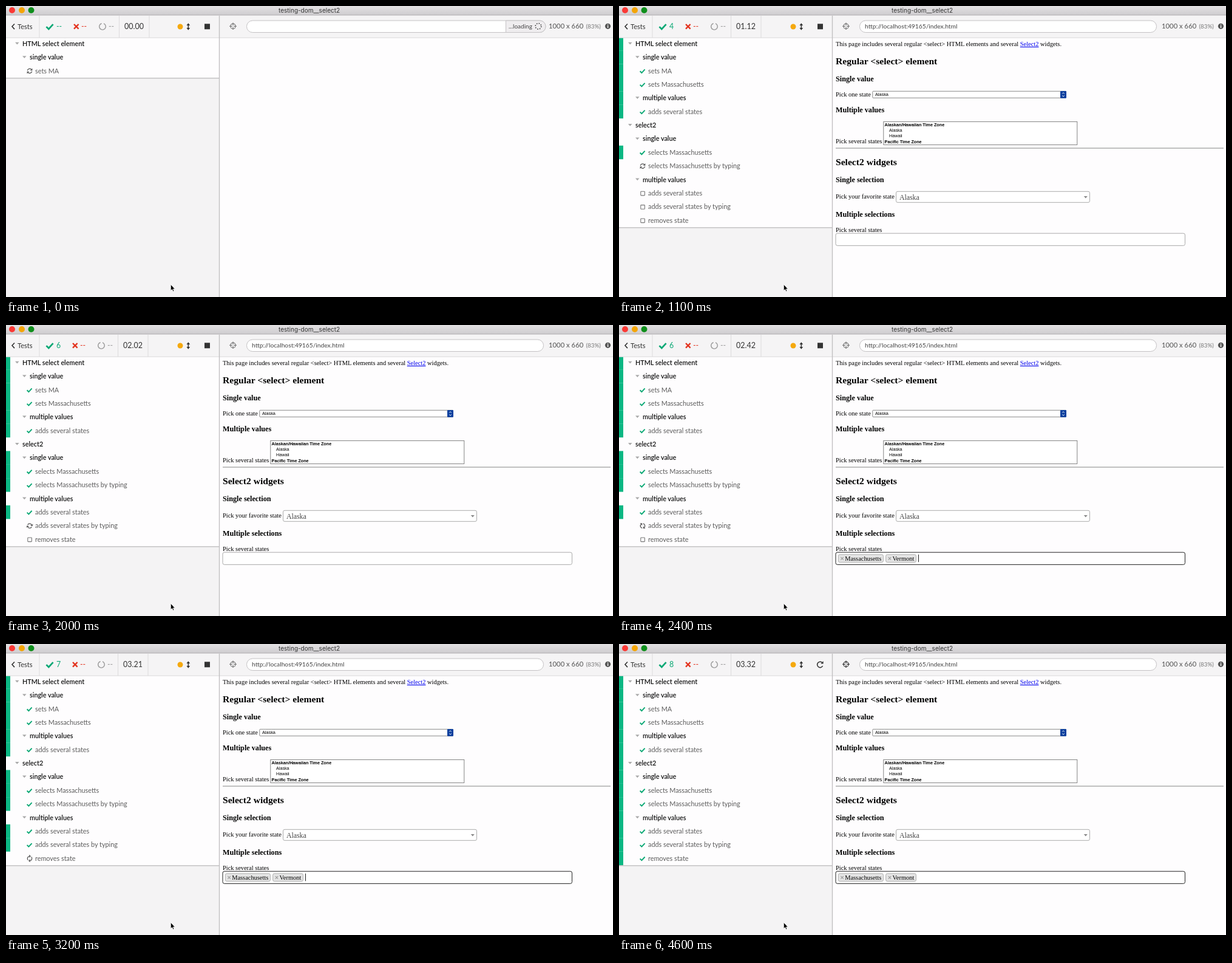
Write an HTML page that moves like this. It is 1000 px wide and 479 px high and loops after 4700 ms.

```html
<!DOCTYPE html>
<html lang="en">
<head>
<meta charset="utf-8">
<title>testing-dom__select2</title>
<style>
  html, body { margin: 0; width: 100%; height: 100%; overflow: hidden; background: #fefdfe; }
  svg { display: block; width: 100vw; height: 100vh; }
  .ui { font-family: Lato, sans-serif; }
  .page { font-family: "Liberation Serif", "Times New Roman", serif; }
  .small { font-family: "Liberation Sans", Arial, sans-serif; }
  .title { font-family: Inter, sans-serif; }
</style>
</head>
<body>
<svg id="stage" viewBox="0 0 1000 479"></svg>
<script>
const LOOP = 4700, STEP = 100, DONE = 3300;
const PAPER = '#fefdfe', GREEN = '#0aa874', RED = '#e3331f', GREY = '#595959';
const ROW = 22.37, TOP = 50.8, BODY = 10.42, OPTION = 19.4;

// depth, label, index of the last test inside
const rows = [
  [0, 'HTML select element', 2],
  [1, 'single value', 1],
  [2, 'sets MA', 0],
  [2, 'sets Massachusetts', 1],
  [1, 'multiple values', 2],
  [2, 'adds several states', 2],
  [0, 'select2', 7],
  [1, 'single value', 4],
  [2, 'selects Massachusetts', 3],
  [2, 'selects Massachusetts by typing', 4],
  [1, 'multiple values', 7],
  [2, 'adds several states', 5],
  [2, 'adds several states by typing', 6],
  [2, 'removes state', 7]
];

const MA = 'Massachusetts', VT = 'Vermont';
const mStates = ['Maine', 'Maryland', MA, 'Michigan', 'New Hampshire', VT];
const loading = { load: true };

// start time, tests passed, what the page shows
const steps = [
  [0, 0, loading],
  [200, 0, { one: MA }],
  [300, 1, loading],
  [400, 1, {}],
  [500, 1, { one: MA }],
  [600, 2, {}],
  [700, 2, { ring: true }],
  [800, 3, {}],
  [1000, 3, { fav: MA }],
  [1100, 4, {}],
  [1300, 4, { open: true }],
  [1400, 4, { fav: MA }],
  [1500, 5, loading],
  [1600, 5, {}],
  [1700, 5, { tags: [MA, VT] }],
  [1900, 6, loading],
  [2000, 6, {}],
  [2100, 6, { focus: true, typed: VT, list: [VT] }],
  [2200, 6, { focus: true, tags: [VT] }],
  [2300, 6, { focus: true, tags: [VT], typed: 'M', list: mStates }],
  [2400, 6, { focus: true, tags: [MA, VT] }],
  [2500, 7, loading],
  [2600, 7, {}],
  [2700, 7, { focus: true, typed: VT, list: [VT] }],
  [2800, 7, { focus: true, tags: [VT], typed: 'M', list: mStates }],
  [2900, 7, { focus: true, tags: [VT], typed: 'Mass', list: [MA] }],
  [3100, 7, { focus: true, tags: [MA, VT] }],
  [DONE, 8, { focus: true, tags: [MA, VT] }]
];

const pen = document.createElement('canvas').getContext('2d');
function measure(str, size, family) {
  pen.font = `${size}px ${family}`;
  return pen.measureText(str).width;
}

const esc = s => s.replace(/&/g, '&amp;').replace(/</g, '&lt;').replace(/>/g, '&gt;');
const text = (x, y, str, size, fill = '#000', cls = 'ui', weight = 400) =>
  `<text x="${x}" y="${y}" font-size="${size}" fill="${fill}" class="${cls}" font-weight="${weight}">${esc(str)}</text>`;
const rect = (x, y, w, h, fill, stroke = 'none', r = 0, sw = 1) =>
  `<rect x="${x}" y="${y}" width="${w}" height="${h}" rx="${r}" fill="${fill}" stroke="${stroke}" stroke-width="${sw}"/>`;
const circle = (x, y, r, fill, more = '') => `<circle cx="${x}" cy="${y}" r="${r}" fill="${fill}" ${more}/>`;
const line = (d, stroke, w = 1, more = '') =>
  `<path d="${d}" fill="none" stroke="${stroke}" stroke-width="${w}" ${more}/>`;
const shape = (d, fill) => `<path d="${d}" fill="${fill}"/>`;
const page = (x, y, str, size = BODY, weight = 400, fill = '#000') => text(x, y, str, size, fill, 'page', weight);

const check = (x, y, k) =>
  line(`M${x - 4 * k} ${y + .2 * k}l${2.8 * k} ${2.8 * k}l${5.2 * k} ${-5.6 * k}`, GREEN, 1.9 * k);

const sync = (x, y, angle) => `<g transform="translate(${x} ${y}) rotate(${angle})">` +
  line('M-3.7 -.7A3.8 3.8 0 0 1 2.7 -2.6M3.7 .7A3.8 3.8 0 0 1 -2.7 2.6', GREY, 1.3) +
  shape('M4.4 -4.5V-.8H.7ZM-4.4 4.5V.8H-.7Z', GREY) + '</g>';

function titleBar() {
  return '<defs><linearGradient id="bar" x2="0" y2="1"><stop stop-color="#e3e1e3"/>' +
    '<stop offset="1" stop-color="#cecccf"/></linearGradient></defs>' +
    rect(0, 0, 1000, 15, 'url(#bar)') + rect(0, 14.5, 1000, 1, '#aeacae') +
    circle(10, 7, 5, '#fb3a36') + circle(26, 7, 5, '#f4a506') + circle(41.5, 7, 5, '#0f8f1c') +
    text(449, 11, 'testing-dom__select2', 10, '#333', 'title');
}

function clock(q) {
  const late = q < 1000 ? 0 : q < 2600 ? 20 : q < 3000 ? 0 : q < DONE ? 10 : 20;
  return ((Math.min(q, DONE) + late) / 1000).toFixed(2).padStart(5, '0');
}

function toolbar(q, passed, view) {
  const dx = passed ? -2 : 0, done = q >= DONE;
  let s = rect(0, 15.5, 1000, 37, '#f5f4f5') + rect(0, 51.7, 1000, 1, '#dcdadc');
  for (const x of [55, 186.5 + dx, 236 + dx]) s += rect(x - .5, 16, 1, 36, '#dddbdd');

  s += line('M14 29.5L10 33.8L14 38.1', '#333', 1.6) + text(19, 37.6, 'Tests', 11.1, '#333');
  s += check(72, 33.8, 1.4) + text(83, 38, passed ? String(passed) : '--', 12.4, GREEN);
  s += line(`M${112 + dx} 30l7.6 7.6m0 -7.6l-7.6 7.6`, RED, 2.4) + text(124 + dx, 38, '--', 12.4, RED);
  s += circle(159 + dx, 33.8, 5.3, 'none', 'stroke="#999" stroke-width="1.4" stroke-dasharray="29 4.3" ' +
    `transform="rotate(-68 ${159 + dx} 33.8)"`) + text(169 + dx, 38, '--', 12.4, '#999');
  s += text(195 + dx, 38, clock(q), 12.5, '#333');

  s += circle(287, 34, 4.5, '#f5a90f') + line('M300.3 30V38', '#333', 1.5) +
    shape('M297.4 32L300.3 28.3L303.2 32ZM297.4 36L300.3 39.7L303.2 36Z', '#333');
  s += done
    ? line('M335.6 36A4.7 4.7 0 1 1 334.6 30.5', '#333', 1.5) + shape('M336.6 28.2V32.6H332.2Z', '#333')
    : rect(327, 29.3, 9, 9, '#333');

  const aim = done ? '#333' : '#777';
  s += circle(374, 33.3, 4.2, 'none', `stroke="${aim}" stroke-width="1.2"`) +
    line('M374 27.5V32M374 34.6V39.1M368.2 33.3H372.7M375.3 33.3H379.8', aim, 1.2);

  s += rect(396.5, 24, view.load ? 492.5 : 489, 19.5, '#fff', '#c4c2c4', 9.7);
  if (view.load) {
    s += `<path d="M823.5 24H879.3A9.7 9.7 0 0 1 879.3 43.5H823.5Z" fill="#efedef" stroke="#c4c2c4"/>` +
      text(828, 37, '...loading', 10, '#444') +
      circle(877, 33.3, 4.8, 'none', 'stroke="#444" stroke-width="1.6" stroke-dasharray="1.7 2.07"');
  }
  if (q) s += text(405, 37, 'http://localhost:49165/index.html', 10.27, '#444');
  s += text(894, 37.3, '1000 x 660', 11.3, '#555') + text(955.5, 37, '(83%)', 9.8, '#777');
  s += circle(991.5, 33.3, 4.6, '#555') + rect(990.8, 32.6, 1.5, 3.4, '#fff') + rect(990.8, 30.4, 1.5, 1.4, '#fff');
  return s;
}

function sidebar(q, passed, started) {
  const shown = q ? rows : rows.slice(0, 3);
  const end = TOP + ROW * shown.length;
  let s = rect(0, 52, 351, 427, '#f4f3f4') + rect(0, 52, 351, end - 52, PAPER) +
    rect(0, end + .2, 351, 1.4, '#c2c0c2');
  shown.forEach(([depth, label, last], i) => {
    const y = 62 + ROW * i, ok = last < passed;
    if (ok) s += rect(0, TOP + ROW * i, 7, ROW + .1, '#0bb783');
    if (depth < 2) {
      const x = 15 + 12 * depth;
      s += shape(`M${x} ${y - 2.2}h6.6l-3.3 3.8z`, '#aaa') +
        text(27 + 12 * depth, y + 3.8, label, 10.8, '#111', 'ui', 600);
      return;
    }
    s += ok ? check(38.6, y + .3, 1)
      : last === passed ? sync(39, y + .2, (q - started) * .18)
      : rect(35.8, y - 2.8, 6.6, 6.6, 'none', '#777', .8, 1.1);
    s += text(48, y + 3.8, label, 10.85, '#5c5c5c');
  });
  return s;
}

// option rows of an open list: '#' marks a group heading
function options(x, y, w, items, hot) {
  return items.map((item, i) => {
    const top = y + OPTION * i, on = item === hot;
    const label = item[0] === '#'
      ? page(x + 4.5, top + 13, item.slice(1), BODY, 700)
      : page(x + 11, top + 13, item, BODY, 400, on ? '#fff' : '#000');
    return (on ? rect(x, top, w, OPTION, '#4a8cfb') : '') + label;
  }).join('');
}

function favorite(view) {
  let s = rect(456.5, 305.3, 319, 18, '#fff', '#aaa', 2.5) +
    page(462, 318.5, view.fav || 'Alaska', 11.8, 400, '#444') + shape('M765.8 313h6l-3 3.6z', '#888');
  if (view.open) {
    s += rect(456.5, 323.3, 319, 150.4, '#fff', '#aaa') + rect(459.5, 326.5, 313, 16.5, '#fff', '#333') +
      '<clipPath id="menu"><rect x="457" y="344" width="318" height="129.2"/></clipPath><g clip-path="url(#menu)">' +
      options(457, 344, 318, ['#Alaskan/Hawaiian Time Zone', 'Alaska', 'Hawaii', '#Pacific Time Zone',
        'California', 'Nevada', 'Oregon'], 'Alaska') + '</g>';
  }
  return s;
}

function several(view, q) {
  let x = 361, s = rect(357, 374.2, 575.5, 20.2, '#fff', view.focus ? '#222' : '#aaa', 2.8);
  for (const tag of view.tags || []) {
    const w = measure(tag, BODY, '"Liberation Serif", serif') + 14.6;
    s += rect(x + .3, 377.8, w - .6, 12.8, '#e4e4e4', '#aaa', 2.5, .9) +
      line(`M${x + 4.4} 382.2l4.4 4.4m0 -4.4l-4.4 4.4`, '#999', 1.1) + page(x + 11.2, 387.8, tag);
    x += w + 3.6;
  }
  if (view.typed) {
    s += text(x, 388, view.typed, 10.6, '#000', 'small');
    x += measure(view.typed, 10.6, '"Liberation Sans", sans-serif');
  }
  const caretOn = q < 3100 || (q - 3100) % 1000 < 500;
  if (view.focus && caretOn) s += rect(x - .4, 377.8, .9, 12.4, '#000');
  if (view.list) {
    const items = ['#Eastern Time Zone', ...view.list];
    const top = Math.max(244, 374 - OPTION * items.length);
    s += `<clipPath id="list"><rect x="357" y="${top}" width="575.5" height="${374 - top}"/></clipPath>` +
      rect(357, top, 575.5, 374.2 - top, '#fff', '#aaa', 1) +
      `<g clip-path="url(#list)">${options(357.4, 374 - OPTION * items.length, 574.8, items, items.at(-1))}</g>`;
  }
  return s;
}

function website(view, q) {
  let s = rect(352, 52, 648, 427, PAPER);
  if (view.load) return s;
  s += `<text x="357" y="66" font-size="${BODY}" class="page">This page includes several regular &lt;select&gt; HTML ` +
    'elements and several <tspan fill="#0000ee" text-decoration="underline">Select2</tspan> widgets.</text>';
  const h2 = (y, str) => page(357, y, str, 15.6, 700);
  const h3 = (y, str) => page(357, y, str, 12.19, 700);

  s += h2(96, 'Regular <select> element') + h3(123.7, 'Single value') + page(357, 148.7, 'Pick one state');
  s += rect(417.8, 140.3, 318.7, 11, '#fff', '#8a8a8a', 1) + rect(727, 139.9, 10, 11.8, '#0a3f9e', 'none', 1) +
    line('M730.2 144.6l1.8 -2l1.8 2M730.2 147.2l1.8 2l1.8 -2', '#fff', .9) +
    text(422, 148.4, view.one || 'Alaska', 7.3, '#000', 'small');

  s += h3(174.8, 'Multiple values') + page(357, 225.8, 'Pick several states');
  s += rect(435.8, 190.4, 319, 38, '#fff', '#777', 0, .9);
  if (view.ring) s += rect(435.3, 189.9, 320, 39, 'none', '#7fa9e6', 1, 2);
  s += text(437.6, 198, 'Alaskan/Hawaiian Time Zone', 7.2, '#000', 'small', 700) +
    text(445, 207.2, 'Alaska', 7.2, '#000', 'small') + text(445, 216.3, 'Hawaii', 7.2, '#000', 'small') +
    text(437.6, 225.8, 'Pacific Time Zone', 7.2, '#000', 'small', 700);
  s += rect(357, 233.4, 639, 1.2, '#999');

  s += h2(262.3, 'Select2 widgets') + h3(290.4, 'Single selection') + page(357, 317, 'Pick your favorite state');
  s += h3(347, 'Multiple selections') + page(357, 371.8, 'Pick several states');
  return s + several(view, q) + favorite(view).replace(/^/, view.list ? '<g display="none">' : '<g>') + '</g>';
}

const pointer = '<path d="M271.3 458.2V468.6L273.7 466.5L275.3 470.1L277 469.3L275.4 465.9H278.4Z" ' +
  'fill="#000" stroke="#fff" stroke-width=".8"/>';

function picture(q) {
  const now = steps.findLast(step => step[0] <= q);
  const [, passed, view] = now;
  const started = steps.find(step => step[1] === passed)[0];
  return website(view, q) + sidebar(q, passed, started) + toolbar(q, passed, view) +
    rect(350.8, 16, 1.4, 463, '#c2c0c2') + titleBar() + pointer;
}

const stage = document.getElementById('stage');
const t0 = performance.now();
let last = -1;

function tick() {
  const t = Math.max(0, performance.now() - t0) % LOOP;
  const q = Math.floor(t / STEP) * STEP;
  if (q !== last) stage.innerHTML = picture(last = q);
  requestAnimationFrame(tick);
}
tick();
</script>
</body>
</html>
```
